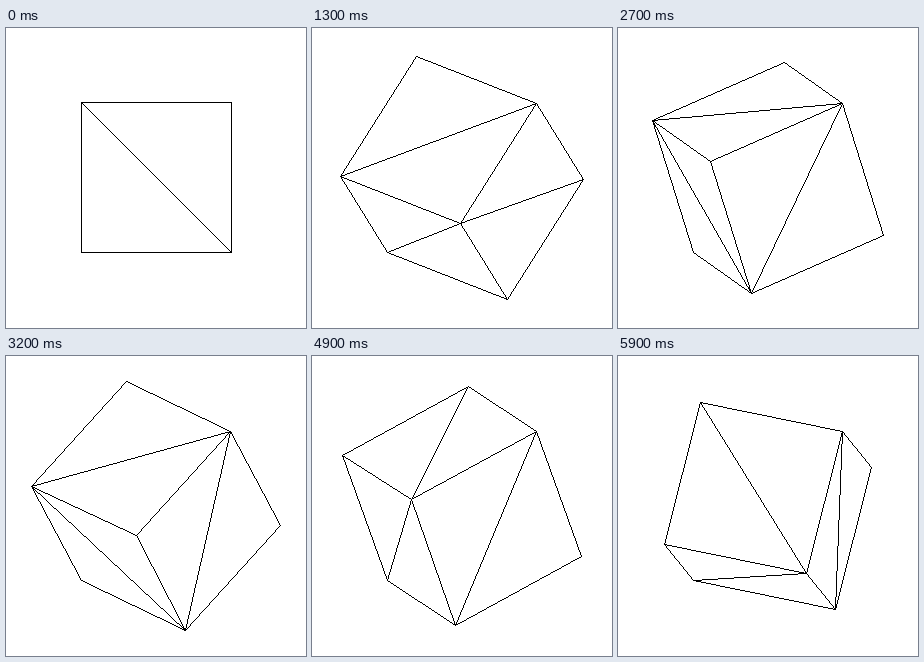
These frames come from a looping animation (300x300 px, 6 s). An HTML page with a canvas:

```html
<!DOCTYPE html>
<html lang="en">
<head>
<meta charset="utf-8">
<title>Turning wire cube</title>
<style>
html, body { margin: 0; width: 100%; height: 100%; overflow: hidden; background: #fff; }
canvas { display: block; width: 300px; height: 300px; image-rendering: pixelated; }
</style>
</head>
<body>
<canvas id="stage" width="300" height="300"></canvas>
<script>
const SIZE = 300, MID = 150, HALF = 75;
const STEP_MS = 100, STEPS = 60, STEP_ANGLE = 0.1;

const ctx = document.getElementById("stage").getContext("2d");

// Each face: axis, side, and the two corners its diagonal joins.
const faces = [
  { axis: 0, side: 1, cut: [[1, 1, 1], [1, -1, -1]] },
  { axis: 1, side: 1, cut: [[1, 1, 1], [-1, 1, -1]] },
  { axis: 2, side: 1, cut: [[-1, 1, 1], [1, -1, 1]] },
  { axis: 0, side: -1, cut: [[-1, 1, 1], [-1, -1, -1]] },
  { axis: 1, side: -1, cut: [[1, -1, 1], [-1, -1, -1]] },
  { axis: 2, side: -1, cut: [[1, -1, -1], [-1, 1, -1]] }
];

// The other two corners of a face, found by swapping one coordinate of its diagonal.
function otherCorners({ axis, cut: [p, q] }) {
  const k = (axis + 1) % 3;
  const swap = (u, v) => u.map((c, i) => (i === k ? v[i] : c));
  return [swap(p, q), swap(q, p)];
}

// Rotation about the cube's space diagonal (1, 1, 1).
function rotation(angle) {
  const mean = (1 - Math.cos(angle)) / 3;
  const turn = Math.sin(angle) / Math.sqrt(3);
  const a = 1 - 2 * mean, b = mean - turn, c = mean + turn;
  return [[a, b, c], [c, a, b], [b, c, a]];
}

// One-pixel line without smoothing, drawn along its longer direction.
function line([x0, y0], [x1, y1]) {
  const steep = Math.abs(y1 - y0) > Math.abs(x1 - x0);
  if (steep) [x0, y0, x1, y1] = [y0, x0, y1, x1];
  if (x0 > x1) [x0, y0, x1, y1] = [x1, y1, x0, y0];
  const dx = x1 - x0, dy = Math.abs(y1 - y0), dir = y1 > y0 ? 1 : -1;
  let y = y0, err = 0;
  for (let x = x0; x <= x1; x++) {
    const [px, py] = steep ? [y, x] : [x, y];
    ctx.fillRect(px, SIZE - 1 - py, 1, 1);
    err += 2 * dy;
    if (err > dx) {
      y += dir;
      err -= 2 * dx;
    }
  }
}

function draw(step) {
  const m = rotation(step * STEP_ANGLE);
  // A hair under full size keeps the fixed corners on the same pixel.
  const scale = HALF * (1 - 1e-9 * step);
  const project = v => [0, 1].map(r =>
    Math.floor(MID + scale * (m[r][0] * v[0] + m[r][1] * v[1] + m[r][2] * v[2])));

  ctx.fillStyle = "#fff";
  ctx.fillRect(0, 0, SIZE, SIZE);
  ctx.fillStyle = "#000";
  for (const face of faces) {
    if (face.side * m[2][face.axis] <= 0) continue;
    const [p, q] = face.cut.map(project);
    line(p, q);
    for (const r of otherCorners(face).map(project)) {
      line(p, r);
      line(r, q);
    }
  }
}

let shown = -1;
function tick() {
  const step = Math.floor(performance.now() / STEP_MS) % STEPS;
  if (step !== shown) draw(shown = step);
  requestAnimationFrame(tick);
}
tick();
</script>
</body>
</html>
```
